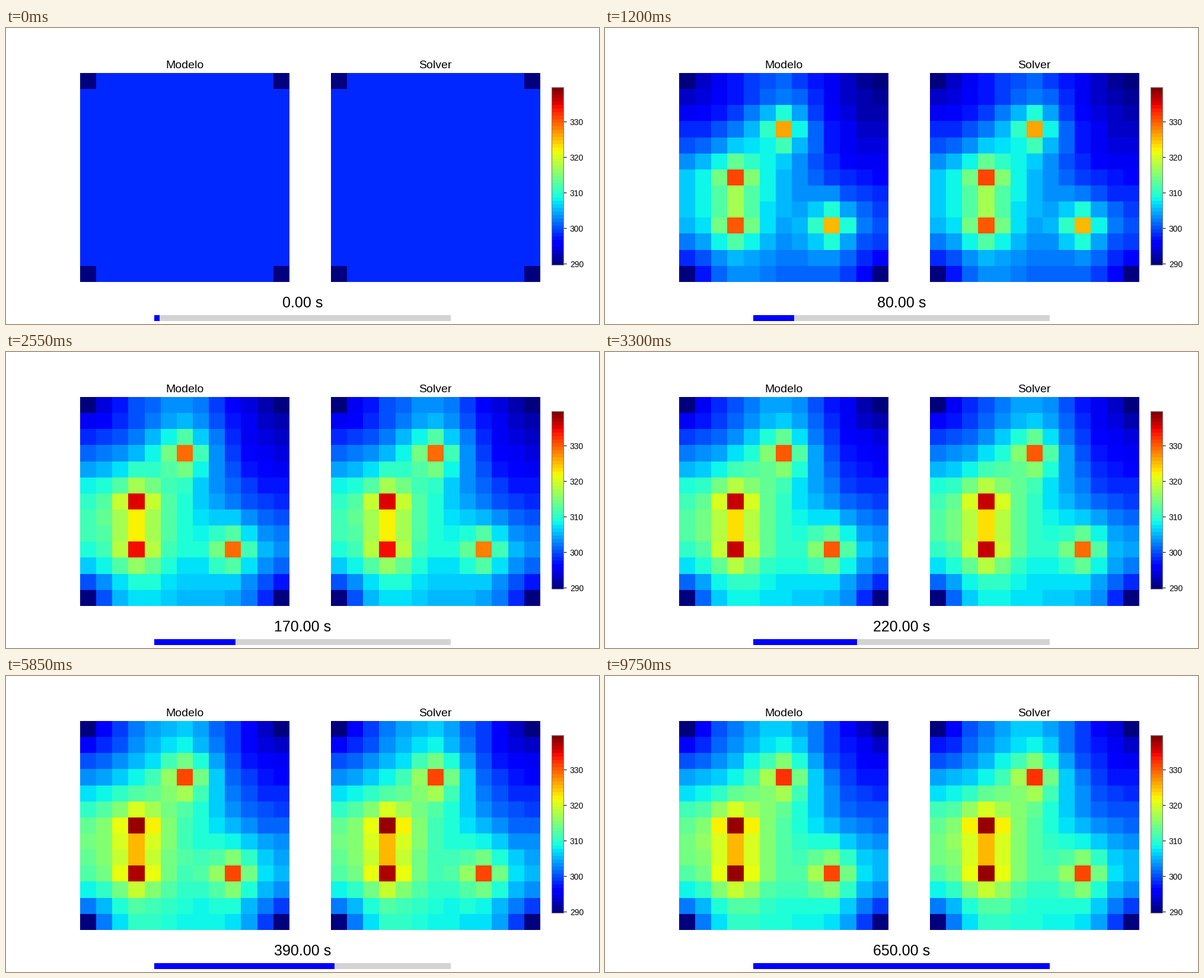
Recreate the animation shown at these times as a matplotlib script. Size 1000 by 500 pixels, loop 9.9 s.

```python
import numpy as np
import matplotlib.pyplot as plt
from matplotlib.animation import FuncAnimation
from matplotlib.patches import Rectangle

plt.rcParams["font.family"] = "Liberation Sans"

# Board: a square plate with four heaters, cold corners and radiative losses
N = 13
DX = 0.1 / (N - 1)
THICKNESS = 0.0015
GL = 10 * THICKNESS                       # conduction between nodes, W/K
GR = 2 * DX**2 * 0.8 * 5.67e-8            # radiation from both faces, W/K^4
CAPACITY = 1850 * 600 * THICKNESS * DX**2
T_ENV, T_CORNER, T_START = 270.0, 290.0, 298.0
HEATERS = [(3, 6), (6, 3), (9, 3), (9, 9)]

FRAMES, INTERVAL = 66, 150
SECONDS_PER_FRAME, DT = 10, 0.25
T_MIN, T_MAX = 289.67, 339.67
BAR_WIDTH = 500


def pin_corners(temp):
    temp[::N - 1, ::N - 1] = T_CORNER
    return temp


def step(temp, power):
    p = np.pad(temp, 1, mode="reflect")
    laplacian = p[:-2, 1:-1] + p[2:, 1:-1] + p[1:-1, :-2] + p[1:-1, 2:] - 4 * temp
    flow = GL * laplacian - GR * (temp**4 - T_ENV**4) + power
    return pin_corners(temp + DT * flow / CAPACITY)


def simulate():
    power = np.zeros((N, N))
    for node in HEATERS:
        power[node] = 1.0
    temp = pin_corners(np.full((N, N), T_START))
    history = [temp]
    for _ in range(FRAMES - 1):
        for _ in range(int(SECONDS_PER_FRAME / DT)):
            temp = step(temp, power)
        history.append(temp)
    return history


def bump(row, col, spread):
    y, x = np.mgrid[:N, :N]
    return np.exp(-((y - row)**2 + (x - col)**2) / (2 * spread**2))


def predict(temp, k):
    """The model follows the solver with a small bias once heating starts."""
    if k == 0:
        return temp
    bias = 0.4 * bump(9, 9, 1.5) - 0.6 * (bump(0, 0, 1) + bump(0, N - 1, 1))
    return pin_corners(temp + bias)


solver = simulate()
model = [predict(temp, k) for k, temp in enumerate(solver)]

fig, axes = plt.subplots(1, 2, figsize=(10, 5), dpi=100)
fig.subplots_adjust(left=0.125, right=0.9, bottom=0.11, top=0.88, wspace=0.2)
fig.patch.set_facecolor("white")

images = []
for ax, title, field in zip(axes, ("Modelo", "Solver"), (model, solver)):
    images.append(ax.imshow(field[0], cmap=plt.get_cmap("jet", 50), vmin=T_MIN,
                            vmax=T_MAX, interpolation="nearest"))
    ax.set_title(title, fontsize=14)
    ax.axis("off")

cbar = fig.colorbar(images[1], cax=fig.add_axes([0.92, 0.2, 0.02, 0.6]),
                    ticks=range(290, 340, 10))
cbar.outline.set_edgecolor("0.5")
cbar.ax.tick_params(labelsize=10, pad=4.3)

clock = fig.text(0.5, 0.056, "", fontsize=18, ha="center", va="baseline")

bar_ax = fig.add_axes([0.25, 0.01, 0.5, 0.02])
bar_ax.set(xlim=(0, BAR_WIDTH), ylim=(0, 1))
bar_ax.axis("off")
bar_ax.add_patch(Rectangle((0, 0), BAR_WIDTH, 1, fc="lightgray", lw=0))
bar = bar_ax.add_patch(Rectangle((0, 0), 0, 1, fc="blue", lw=0))


def draw(k):
    images[0].set_data(model[k])
    images[1].set_data(solver[k])
    clock.set_text(f"{k * SECONDS_PER_FRAME:.2f} s")
    bar.set_width(min(round(BAR_WIDTH * (k + 1) / FRAMES) + 1, BAR_WIDTH))
    return [*images, clock, bar]


anim = FuncAnimation(fig, draw, frames=FRAMES, interval=INTERVAL,
                     repeat=True, repeat_delay=0, blit=False)
plt.show()
```
